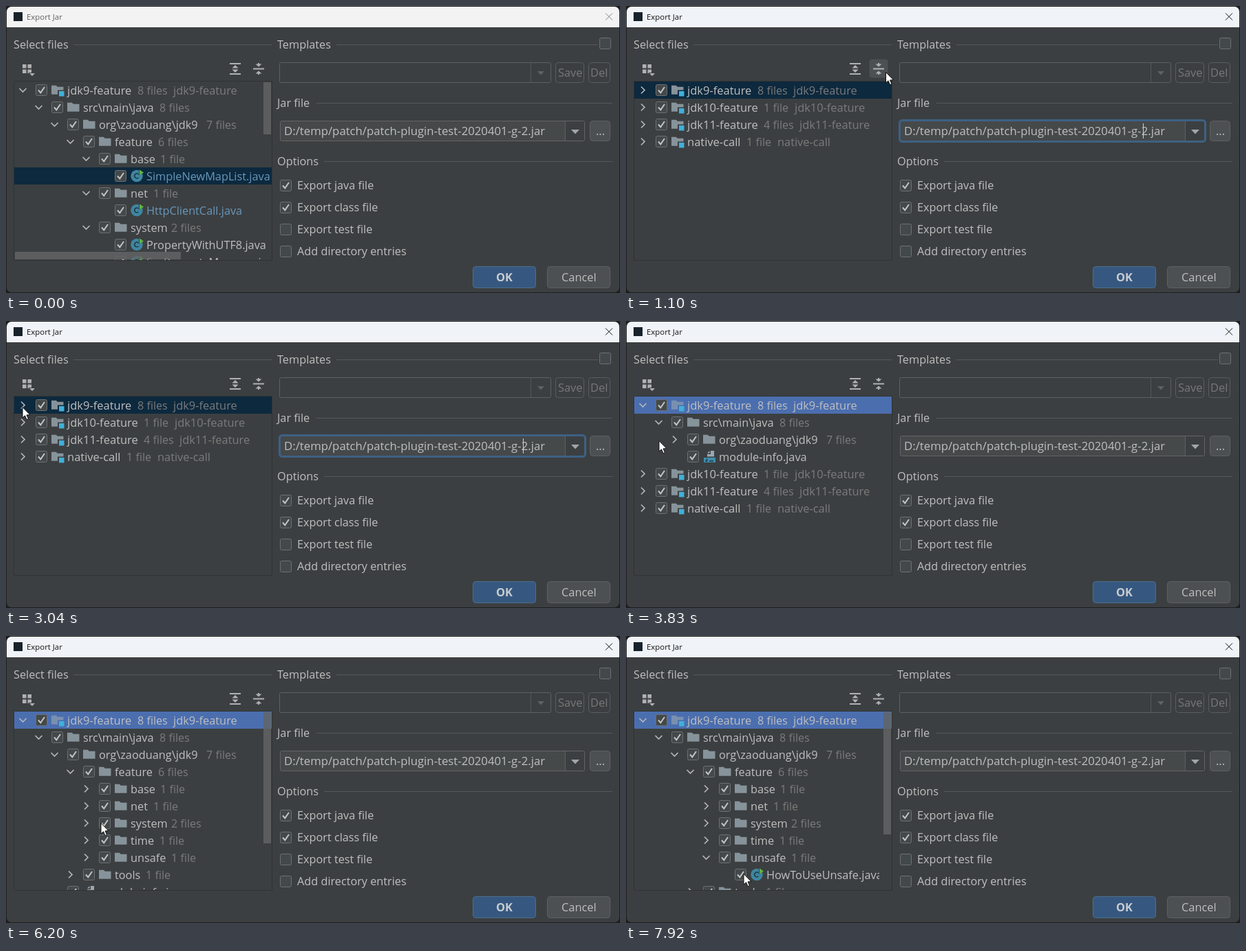
Animation, 892 px wide and 418 px high, one loop 8 s. Source, as an HTML page with a canvas:

```html
<!DOCTYPE html>
<html lang="en">
<head>
<meta charset="utf-8">
<title>Export Jar</title>
<style>
  html, body { margin: 0; width: 100%; height: 100%; overflow: hidden; background: #1e1e1e; }
  canvas { display: block; width: 892px; height: 418px; }
</style>
</head>
<body>
<canvas id="stage" width="892" height="418"></canvas>
<script>
const ctx = document.getElementById('stage').getContext('2d');
const LOOP = 8000;
const FONT = '"Open Sans", "Noto Sans", sans-serif';
const BG = '#3c3f41', TEXT = '#bfbfbf', DIM = '#7b7b7b', LINE = '#55585a', CHANGED = '#6897bb';

// [level, kind, name, suffix, suffix x, module, module x]
const ROWS = {
  jdk9: [0, 'module', 'jdk9-feature', '8 files', 191, 'jdk9-feature', 243],
  jdk10: [0, 'module', 'jdk10-feature', '1 file', 200, 'jdk10-feature', 245],
  jdk11: [0, 'module', 'jdk11-feature', '4 files', 200, 'jdk11-feature', 252],
  native: [0, 'module', 'native-call', '1 file', 175, 'native-call', 220],
  src: [1, 'folder', 'src\\main\\java', '8 files', 223],
  org: [2, 'folder', 'org\\zaoduang\\jdk9', '7 files', 291],
  info: [2, 'info', 'module-info.java'],
  feature: [3, 'folder', 'feature', '6 files', 221],
  tools: [3, 'folder', 'tools', '1 file', 203],
  base: [4, 'folder', 'base', '1 file', 224],
  net: [4, 'folder', 'net', '1 file', 214],
  system: [4, 'folder', 'system', '2 files', 240],
  time: [4, 'folder', 'time', '1 file', 223],
  unsafe: [4, 'folder', 'unsafe', '1 file', 240],
  list: [5, 'class', 'SimpleNewMapList.java'],
  http: [5, 'class', 'HttpClientCall.java'],
  prop: [5, 'class', 'PropertyWithUTF8.java'],
  sys: [5, 'class', 'SysPropertyManager.java'],
  howto: [5, 'class', 'HowToUseUnsafe.java']
};

// thumb: bottom edge of the vertical scroll thumb
const TREES = [
  { at: 0, rows: 'jdk9 src org feature base list net http system prop sys', thumb: 187, wide: true },
  { at: 960, rows: 'jdk9 jdk10 jdk11 native' },
  { at: 3360, rows: 'jdk9 src org info jdk10 jdk11 native' },
  { at: 4730, rows: 'jdk9 src org feature tools info jdk10 jdk11 native' },
  { at: 5870, rows: 'jdk9 src org feature base net system time unsafe tools info', thumb: 302 },
  { at: 7300, rows: 'jdk9 src org feature base net system time unsafe howto tools', thumb: 289 }
];

// Screen refreshes come in bursts: [start, end, count]
const BURSTS = [
  [70, 760, 11], [960, 1730, 12], [1800, 2080, 5], [2410, 3040, 10], [3360, 3490, 2], [3690, 4460, 12],
  [4730, 4860, 2], [5130, 5340, 4], [5870, 6130, 3], [6200, 6620, 7], [6690, 7040, 6], [7300, 7650, 6],
  [7850, 7920, 2]
];

// Pointer path: [time, x, y]
const PATH = [
  [70, 761, 357], [340, 615, 245], [560, 445, 122], [690, 384, 98], [760, 377, 96], [1100, 377, 96],
  [1450, 215, 148], [1730, 90, 140], [2080, 47, 127], [2340, 47, 127], [2760, 31, 131], [3040, 23.5, 125],
  [3620, 23.5, 125], [3830, 47.5, 174], [4100, 88, 198], [4320, 77, 181], [4460, 71, 174], [5060, 71, 174],
  [5340, 91.5, 199], [6060, 91.5, 199], [6200, 137.5, 272], [6620, 147, 310], [7040, 114, 321],
  [7300, 114, 321], [7650, 171, 347], [7850, 171, 346], [7920, 170.5, 346]
];

function snap(t) {
  let held = 0;
  for (const [a, b, n] of BURSTS) {
    if (t < a) break;
    const gap = (b - a) / (n - 1);
    held = Math.min(b, a + Math.floor((t - a) / gap + 1e-6) * gap);
  }
  return held;
}

function pointerAt(t) {
  if (t < PATH[0][0]) return null;
  const i = PATH.findIndex(p => p[0] > t);
  if (i < 0) return PATH[PATH.length - 1].slice(1);
  const [a, ax, ay] = PATH[i - 1], [b, bx, by] = PATH[i];
  const k = (t - a) / (b - a);
  return [ax + (bx - ax) * k, ay + (by - ay) * k];
}

function text(str, x, y, color = TEXT, size = 16.3, weight = 400) {
  ctx.font = `${weight} ${size}px ${FONT}`;
  ctx.fillStyle = color;
  ctx.fillText(str, x, y);
}

function rect(x, y, w, h, color) {
  ctx.fillStyle = color;
  ctx.fillRect(x, y, w, h);
}

function box(x, y, w, h, fill, stroke, r = 3, width = 1) {
  ctx.beginPath();
  ctx.roundRect(x + .5, y + .5, w - 1, h - 1, r);
  if (fill) { ctx.fillStyle = fill; ctx.fill(); }
  if (stroke) { ctx.strokeStyle = stroke; ctx.lineWidth = width; ctx.stroke(); }
}

function poly(points, fill) {
  ctx.beginPath();
  points.forEach(([x, y]) => ctx.lineTo(x, y));
  ctx.closePath();
  ctx.fillStyle = fill;
  ctx.fill();
}

function line(points, color, width) {
  ctx.beginPath();
  points.forEach(([x, y]) => ctx.lineTo(x, y));
  ctx.strokeStyle = color;
  ctx.lineWidth = width;
  ctx.stroke();
}

function checkbox(cx, cy, on) {
  box(cx - 8.5, cy - 8.5, 17, 17, '#43494a', '#6e7072', 2);
  if (on) line([[cx - 4.5, cy], [cx - 1.2, cy + 3.8], [cx + 4.5, cy - 4.5]], '#c4c4c4', 2);
}

function heading(str, y, from, to) {
  text(str, from[0], y + 6);
  rect(from[1], y, to - from[1], 1, LINE);
}

function button(str, x, y, w, h, tx, fill, edge, color, weight) {
  box(x, y, w, h, fill, edge, 4);
  text(str, tx, y + h / 2 + 6, color, 16.4, weight);
}

function chevron(cx, cy, open) {
  const pts = open ? [[-5, -2.5], [0, 2.5], [5, -2.5]] : [[-2.5, -5], [2.5, 0], [-2.5, 5]];
  line(pts.map(([x, y]) => [cx + x, cy + y]), '#b4b6b8', 1.7);
}

function folder(x, y, color) {
  const r = x + 17.5, b = y + 6.3;
  poly([[x, y - 6.7], [x + 6.8, y - 6.7], [x + 8.8, y - 4.8], [r, y - 4.8], [r, b], [x, b]], color);
}

function classIcon(x, y) {
  ctx.beginPath();
  ctx.arc(x + 9, y, 8.75, 0, 7);
  ctx.fillStyle = '#3e86a0';
  ctx.fill();
  ctx.beginPath();
  ctx.arc(x + 9, y, 3.3, .8, 5.5);
  ctx.strokeStyle = '#23383f';
  ctx.lineWidth = 1.6;
  ctx.stroke();
  poly([[x + 12, y - 9.5], [x + 19, y - 5], [x + 12, y - .5]], BG);
  poly([[x + 13, y - 9], [x + 19, y - 5], [x + 13, y - 1]], '#62b543');
}

function infoIcon(x, y) {
  poly([[x + 11, y - 8.5], [x + 16, y - 8.5], [x + 16, y], [x + 6, y], [x + 6, y - 3.5], [x + 11, y - 3.5]], '#9aa7b0');
  poly([[x + 9.5, y - 8.5], [x + 9.5, y - 5], [x + 6, y - 5]], '#9aa7b0');
  rect(x + 1, y + 1.5, 17, 7, '#3f8fae');
  line([[x + 5.5, y + 3], [x + 5.5, y + 6.5], [x + 3, y + 6.5]], '#24363e', 1.5);
  line([[x + 9, y + 6.5], [x + 15, y + 6.5]], '#24363e', 1.5);
}

function drawTree(t) {
  const tree = TREES.filter(s => s.at <= t).pop();
  const keys = tree.rows.split(' ');
  const focused = t >= 3360;
  const picked = tree.wide ? 'list' : 'jdk9';

  box(11, 109, 376, 262, null, '#303233', 0);
  ctx.save();
  ctx.beginPath();
  ctx.rect(12, 110, 374, 260);
  ctx.clip();
  keys.forEach((key, i) => {
    const [level, kind, name, count, countX, module, moduleX] = ROWS[key];
    const y = 122.5 + 25 * i, dx = 23 * level, base = y + 6.5;
    const active = focused && key === picked;
    const leaf = kind === 'class' || kind === 'info';
    const rowColor = key !== picked ? BG : focused ? '#4b6eaf' : '#0d293e';
    if (key === picked) rect(12, y - 12.5, 374, 25, rowColor);
    if (!leaf) {
      const next = ROWS[keys[i + 1]];
      chevron(24.5 + dx, y, next && next[0] > level);
    }
    checkbox(51.5 + dx, y, true);
    if (kind === 'class') classIcon(181, y);
    else if (kind === 'info') infoIcon(66 + dx, y);
    else folder(66 + dx, y, active ? '#7a90b0' : '#87939a');
    if (kind === 'module') {
      rect(75, y, 10, 10, rowColor);
      rect(77, y + 1.5, 7.5, 7.5, '#40b0da');
    }
    ctx.save();
    if (key === 'howto' || key === 'sys') {
      ctx.beginPath();
      ctx.rect(0, 0, key === 'sys' ? 375 : 368, 418);
      ctx.clip();
    }
    const tint = key === 'list' || key === 'http' ? CHANGED : TEXT;
    text(name, 89 + dx, base, tint, kind === 'module' ? 16.5 : 16.3);
    ctx.restore();
    const faint = active ? TEXT : DIM;
    if (count) text(count, countX, base, faint, 16.1);
    if (module) text(module, moduleX, base, faint, 16.4);
  });
  const thumb = 'rgba(98,100,101,.82)';
  if (tree.thumb) rect(374, 111, 11, tree.thumb - 111, thumb);
  if (tree.wide) rect(13, 358, 241, 11, thumb);
  ctx.restore();
}

function drawToolbar(hover) {
  const ink = '#afb1b3';
  for (const x of [24, 31.5]) for (const y of [85, 92.5]) rect(x, y, 5.5, 5.5, ink);
  poly([[33, 97], [43, 97], [43, 102], [33, 102]], BG);
  poly([[34, 98], [42, 98], [38, 102]], ink);

  if (hover) box(353, 77, 28, 28, '#4c5052', null, 4);
  rect(325, 83, 16, 2, ink);
  rect(325, 98, 16, 2, ink);
  poly([[333, 86], [337.5, 90.5], [328.5, 90.5]], ink);
  poly([[333, 97], [337.5, 92.5], [328.5, 92.5]], ink);
  rect(359, 90.5, 16, 2, ink);
  for (const s of [-1, 1]) {
    poly([[367, 91.5 + 3 * s], [371.5, 91.5 + 7 * s], [362.5, 91.5 + 7 * s]], ink);
    rect(366, s < 0 ? 83 : 97, 2, 3, ink);
  }
}

function drawFrame(active) {
  rect(0, 0, 892, 418, '#1e1e1e');
  ctx.save();
  ctx.beginPath();
  ctx.roundRect(1, 1, 890, 416, 7);
  ctx.clip();
  rect(1, 1, 890, 416, BG);
  rect(1, 1, 890, 30, active ? '#f0f4f9' : '#f3f3f3');
  ctx.restore();
  rect(11, 9, 13, 13, '#17222b');
  const ink = active ? '#111' : '#868686';
  text('Export Jar', 30, 20, active ? '#111' : '#606060', 11.4);
  line([[871, 10.5], [881, 20.5]], ink, 1);
  line([[881, 10.5], [871, 20.5]], ink, 1);
}

function drawForm(focus, caret) {
  heading('Templates', 56, [394, 480], 860);
  checkbox(870.5, 54.5, false);
  box(397, 82, 395, 30, BG, '#5e6162', 2);
  rect(762, 83, 1, 28, '#55585a');
  poly([[772, 95], [782, 95], [777, 100.5]], '#5f6263');
  button('Save', 798, 82, 42, 30, 802, BG, '#5a5d5f', '#777');
  button('Del', 846, 82, 32, 30, 849, BG, '#5a5d5f', '#777');

  heading('Jar file', 141, [394, 451], 881);
  box(398, 167, 443, 30, '#45494a', '#646464', 2);
  rect(813, 168, 27, 28, BG);
  rect(812, 168, 1, 28, '#5e6060');
  if (focus) box(397, 166, 445, 32, null, '#3d6185', 4, 3);
  text('D:/temp/patch/patch-plugin-test-2020401-g-2.jar', 404, 188, TEXT, 16.75);
  if (caret) rect(751, 171, 1, 22, '#d0d0d0');
  poly([[821, 180], [833, 180], [827, 186.5]], '#a2a5a7');
  button('...', 848, 167, 30, 30, 857, '#4c5052', '#5e6060', TEXT);

  heading('Options', 226, [394, 462], 881);
  ['Export java file', 'Export class file', 'Export test file', 'Add directory entries'].forEach((label, i) => {
    const y = 261 + 32 * i;
    checkbox(406.5, y + .5, i < 2);
    text(label, 423, y + 6, TEXT, 16.25);
  });
  button('OK', 678, 379, 92, 32, 712, '#365880', '#4c708c', '#c8ccd0', 700);
  button('Cancel', 786, 379, 92, 32, 807, '#4c5052', '#5e6060', TEXT);
}

function drawPointer(x, y) {
  ctx.save();
  ctx.translate(x, y);
  ctx.beginPath();
  [[.5, .5], [.5, 16], [4, 12.8], [6.6, 18.6], [9, 17.6], [6.5, 11.9], [11.5, 11.7]].forEach(p => ctx.lineTo(...p));
  ctx.closePath();
  ctx.fillStyle = '#fff';
  ctx.fill();
  ctx.strokeStyle = '#111';
  ctx.lineWidth = 1;
  ctx.stroke();
  ctx.restore();
}

function draw(now) {
  const t = snap(now % LOOP);
  const pointer = pointerAt(t);
  const [px, py] = pointer || [0, 0];
  const hover = px >= 353 && px < 381 && py >= 77 && py < 105;
  const editing = t >= 960 && t < 3360;
  const caret = editing && (t - 960) % 1000 < 500;

  drawFrame(t >= 960);
  heading('Select files', 56, [11, 98], 386);
  drawToolbar(hover);
  drawTree(t);
  drawForm(editing, caret);
  if (pointer) drawPointer(px, py);
}

const start = performance.now();
function tick() {
  draw(performance.now() - start);
  requestAnimationFrame(tick);
}
tick();
</script>
</body>
</html>
```
